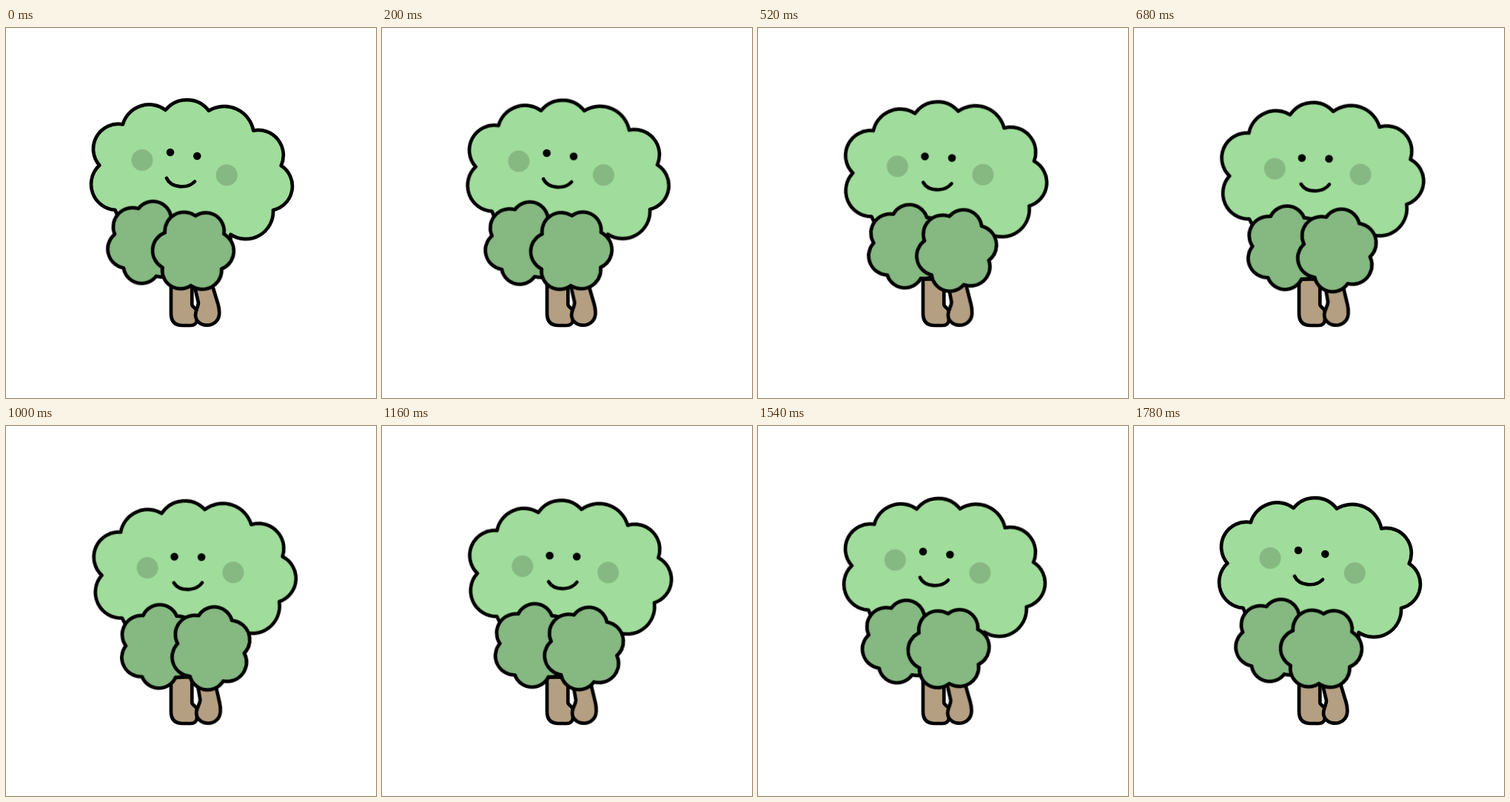
An HTML page for the animation above (1.8 s loop, 500 px wide and 500 px high).

```html
<!DOCTYPE html>
<html lang="en">
<head>
<meta charset="utf-8">
<title>Swaying tree</title>
<style>
  html, body { margin: 0; width: 100%; height: 100%; overflow: hidden; background: #fff; }
  svg { display: block; width: 100vw; height: 100vh; }

  .line { stroke: #000; stroke-width: 4.7; stroke-linejoin: round; stroke-linecap: round; }
  .crown { fill: #a0dc9b; }
  .bush { fill: #86b882; }
  .wood { fill: #b49f83; }

  /* Each part leans to its own offset and angle, then back */
  .sway {
    transform-origin: var(--at);
    animation: sway 900ms cubic-bezier(.37, 0, .63, 1) infinite alternate;
  }
  @keyframes sway {
    from { transform: translate(0px, 0px) rotate(0deg); }
    to { transform: translate(var(--x), var(--y)) rotate(var(--turn)); }
  }
  #head  { --at: 247px 143px; --x: -2px; --y: 3.9px; --turn: -6.2deg; }
  #face  { --at: 240px 185px; --x: 7.7px; --y: 6.5px; --turn: -7.2deg; }
  #leg   { --at: 272px 395px; --x: .8px; --y: 0px; --turn: 4deg; }
  #back  { --at: 191px 289.7px; --x: 16.8px; --y: 8.4px; --turn: -13.4deg; }
  #front { --at: 253px 301px; --x: 24.7px; --y: -.5px; --turn: -25.2deg; }
</style>
</head>
<body>
<svg viewBox="0 0 500 500">
  <defs>
    <path id="flower" d="M41.3 -22.75
      A24.7 24.7 0 0 1 41.3 22.75 A26 26 0 0 1 0 45.5
      A26 26 0 0 1 -41.3 22.75 A24.7 24.7 0 0 1 -41.3 -22.75
      A26 26 0 0 1 0 -45.5 A26 26 0 0 1 41.3 -22.75Z"/>
  </defs>

  <g id="head" class="sway">
    <path class="line crown" d="M126.3 185.6
      A33.7 33.7 0 0 1 157.8 130.3 A37 37 0 0 1 215.6 110.9
      A37 37 0 0 1 274 111.8 A40 40 0 0 1 334.3 138.6
      A34 34 0 0 1 371.8 186 A33 33 0 0 1 361 246
      A37 37 0 0 1 303.6 279 A50 50 0 0 1 200 284
      A55 55 0 0 1 147.4 245.8 A34.7 34.7 0 0 1 126.3 185.6Z"/>
  </g>

  <g id="face" class="sway">
    <g class="bush">
      <circle cx="184" cy="178.5" r="14.5"/>
      <circle cx="298.3" cy="198.8" r="14.5"/>
    </g>
    <circle cx="222" cy="168" r="5.3"/>
    <circle cx="258.3" cy="173" r="5.3"/>
    <path class="line" fill="none" d="M217 203C223 216 245 218 255 207.5"/>
  </g>

  <path class="line wood" d="M223 339.5H251.3V374C252 378 257 378 258 383V395
    Q257 402 249 402H239Q223 402 223 386Z"/>
  <g id="leg" class="sway">
    <path class="line wood" d="M249 325L260 371C260 377 256 381 256 388
      C256.3 396 263 401.7 271 401.7C281 401.7 288.3 395 288.3 385
      Q288.3 379 286.5 373L272 325Z"/>
  </g>

  <g id="back" class="sway">
    <use href="#flower" class="line bush" transform="translate(191 289.7) rotate(-76)"/>
  </g>
  <g id="front" class="sway">
    <use href="#flower" class="line bush" transform="translate(253 301) rotate(-57.4)"/>
  </g>
</svg>
</body>
</html>
```
